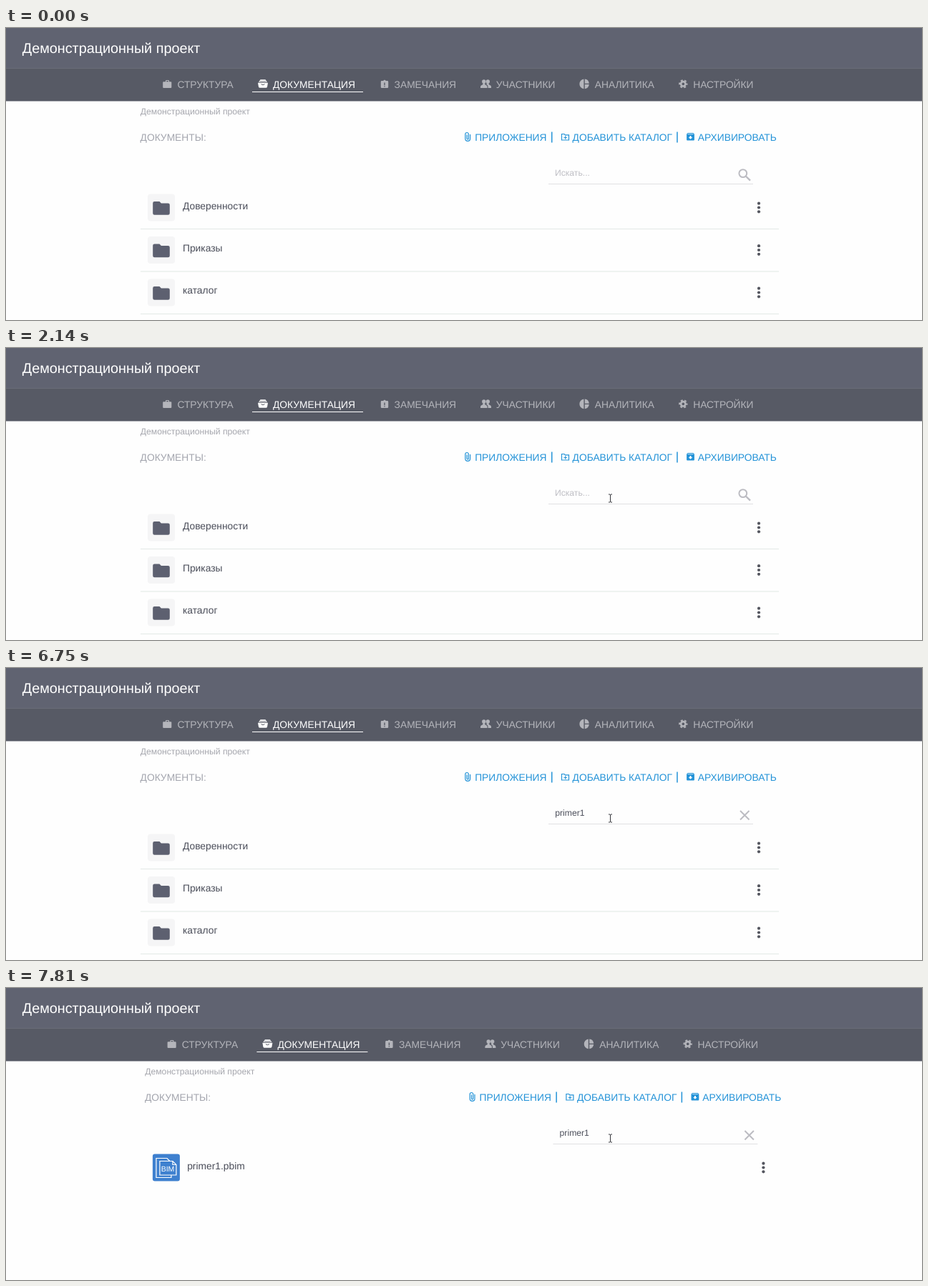
An HTML page that plays this animation: 1280x409 px, repeating every 8000 ms.

```html
<!DOCTYPE html>
<html lang="ru">
<head>
<meta charset="utf-8">
<title>Документы проекта</title>
<style>
  html, body { margin: 0; width: 100%; height: 100%; overflow: hidden; background: #fefefe; }
  svg { display: block; width: 1280px; height: 409px; }
  text { font: 13.8px "Liberation Sans", Arial, sans-serif; text-rendering: geometricPrecision; white-space: pre; }
  .title { font-size: 19.8px; fill: #fff; }
  .tab { fill: #b4b5bb; }
  .active { fill: #fff; }
  .crumb { font-size: 12.2px; fill: #a6a7ae; }
  .label { fill: #a3a5ae; }
  .link { fill: #2493d8; }
  .line { fill: none; stroke: #2493d8; stroke-width: 1.2; }
  .hint { font-size: 12.2px; fill: #bfbfc5; }
  .query { font-size: 12.2px; fill: #4d505c; }
  .name { fill: #4a4d59; }
  .glyph { fill: none; stroke: #bcbcc2; stroke-width: 2; }
  .dots { fill: #54565f; }
  .pointer { fill: #fff; stroke: #25262c; stroke-width: 1; stroke-linejoin: round; }
</style>
</head>
<body>
<svg viewBox="0 0 1280 409">
  <defs>
    <g id="dots" class="dots">
      <circle cx="1052" cy="245.7" r="2.1"/><circle cx="1052" cy="251.5" r="2.1"/><circle cx="1052" cy="257.3" r="2.1"/>
    </g>
    <g id="row">
      <rect x="198" y="232.5" width="38" height="38" rx="4" fill="#f5f5f6"/>
      <path d="M207.500 243h7l2.400 2.400h9.600a2.300 2.300 0 0 1 2.300 2.300v11.800a2.300 2.300 0 0 1-2.300 2.300h-19a2.300 2.300 0 0 1-2.300-2.300v-14.200a2.300 2.300 0 0 1 2.300-2.300z" fill="#5d6070"/>
      <use href="#dots"/>
      <rect x="188" y="281" width="892" height="1" fill="#e2e9e6"/>
    </g>
  </defs>

  <rect width="1280" height="409" fill="#fefefe"/>
  <rect width="1280" height="57" fill="#606371"/>
  <rect y="56" width="1280" height="1" fill="#6a6c78"/>
  <rect y="57" width="1280" height="45.500" fill="#575a65"/>
  <text class="title" x="22.800" y="35">Демонстрационный проект</text>

  <g id="page">
    <g class="tab">
      <path fill-rule="evenodd" d="M220.200 75.300h2.800v-1.300q0-1 1-1h3q1 0 1 1v1.300h2.300q1 0 1 1v6.600q0 1-1 1h-10.100q-1 0-1-1v-6.600q0-1 1-1zm4-1.200v1.200h2.600v-1.200z"/>
      <path fill-rule="evenodd" d="M525 74h2.300a1.800 1.800 0 0 1 3.400 0h2.300q1.200 0 1.200 1.200v7.600q0 1.200-1.200 1.200h-8q-1.200 0-1.200-1.200v-7.600q0-1.200 1.200-1.200zm3.300 2.500v3.800h1.400v-3.800zm0 4.800v1.300h1.400v-1.300z"/>
      <circle cx="667.800" cy="75" r="2.700"/>
      <circle cx="673.300" cy="75" r="2.700"/>
      <path d="M663 84v-2q0-1.700 3.300-2.800v-2h3v2q3.200 1.100 3.200 2.800v2zM673.600 84v-2q0-2-2.300-3.200l.7-1.600h2.700v2q3.300 1.100 3.300 2.800v2z"/>
      <path d="M807.400 71.600v13.600a6.850 6.850 0 0 1 0-13.600zM808.800 71.600a6.800 6.800 0 0 1 6 6.100h-6zM808.800 79.100h6a6.800 6.800 0 0 1-6 6.100z"/>
      <g fill="none" stroke="#b4b5bb">
        <circle cx="946.300" cy="78.300" r="3.200" stroke-width="2.600"/>
        <circle cx="946.300" cy="78.300" r="5.200" stroke-width="1.900" stroke-dasharray="2.900 2.545" stroke-dashoffset="1.450"/>
      </g>
      <text x="239.400" y="83.800">СТРУКТУРА</text>
      <text x="542.600" y="83.800">ЗАМЕЧАНИЯ</text>
      <text x="684.800" y="83.800">УЧАСТНИКИ</text>
      <text x="822.800" y="83.800">АНАЛИТИКА</text>
      <text x="960.200" y="83.800">НАСТРОЙКИ</text>
    </g>
    <g class="active">
      <path d="M355.500 72.300h7l2.500 3.500h-12zM352 76.700h14l-1 5.800q-.4 1.300-1.700 1.300h-8.600q-1.300 0-1.700-1.300z"/>
      <path d="M356.500 78.800q2.500 1.800 5 0" fill="none" stroke="#575a65"/>
      <path d="M354.700 74.800h8.600" stroke="#575a65" stroke-width=".7"/>
      <text x="373" y="83.800">ДОКУМЕНТАЦИЯ</text>
      <rect x="344" y="89" width="155" height="1"/>
    </g>

    <text class="crumb" x="187.800" y="121.300">Демонстрационный проект</text>
    <text class="label" x="187.600" y="157.800">ДОКУМЕНТЫ:</text>
    <g class="link">
      <path class="line" d="M648.600 149v6a3.400 3.400 0 0 1-6.800 0v-6.200a2.300 2.300 0 0 1 4.600 0v6a1.150 1.150 0 0 1-2.300 0v-5.200"/>
      <path class="line" d="M776.500 148.500h3.700l1.200 1.300h5.100v7.200h-10zM779.500 153.500h4.400M781.700 151.300v4.400"/>
      <path fill-rule="evenodd" d="M952.500 147h8l1.400 1.800v7.700q0 1-1 1h-8.800q-1 0-1-1v-7.700zm0 1.100v.7h8v-.7zm3 2.900v2h-1.800l2.800 2.800 2.800-2.800h-1.800v-2z"/>
      <text x="655.200" y="157.800">ПРИЛОЖЕНИЯ</text>
      <text x="791.600" y="157.800">ДОБАВИТЬ КАТАЛОГ</text>
      <text x="966.800" y="157.800">АРХИВИРОВАТЬ</text>
      <rect x="762" y="145.500" width="1.500" height="15"/>
      <rect x="937.200" y="145.500" width="1.500" height="15"/>
    </g>

    <rect x="758" y="218" width="286" height="1" fill="#e0e0e3"/>
    <g id="empty">
      <text class="hint" x="766.900" y="207">Искать...</text>
      <g class="glyph"><circle cx="1029.800" cy="203.600" r="5.400"/><path d="M1033.700 207.500l6.300 6.100" stroke-width="2.400"/></g>
    </g>
    <path id="clear" class="glyph" d="M1026 200l12.500 12.500M1038.500 200L1026 212.500"/>
    <text id="query" class="query" x="767.200" y="207"></text>
    <rect id="caret" y="197" width="1" height="13" fill="#4d505c"/>

    <g id="list">
      <use href="#row"/><use href="#row" y="59.500"/><use href="#row" y="119"/>
      <g class="name">
        <text x="247" y="253.500">Доверенности</text>
        <text x="247" y="313">Приказы</text>
        <text x="247" y="372.300">каталог</text>
      </g>
    </g>
    <g id="found">
      <rect x="198.500" y="232.500" width="38" height="38" rx="3" fill="#3e80cf"/>
      <g fill="none" stroke="#fff" stroke-width="1.200">
        <path d="M224.500 262v3.500h-21v-27h15l4 4"/>
        <path d="M208.500 242.500h18l5 5v14.500h-23z" fill="#3e80cf"/>
        <path d="M226.500 242.500v5h5"/>
      </g>
      <text x="210.300" y="257" fill="#fff" style="font-size:10.500px">BIM</text>
      <text class="name" x="246.800" y="253.500">primer1.pbim</text>
      <use href="#dots"/>
    </g>
  </g>

  <g id="spinner" fill="none" stroke-width="2">
    <circle cx="640" cy="240.500" r="10.800" stroke="#dcdcdf"/>
    <path d="M640 251.300a10.800 10.800 0 0 1-10.800-10.800" stroke="#565967"/>
  </g>
  <g id="hand">
    <path class="pointer" d="M-1.500 11V1.300a1.500 1.500 0 0 1 3 0V7q.3-1.300 1.500-1.200 1.200.1 1.300 1.500.3-1 1.400-.8 1 .2 1.100 1.400.4-.7 1.200-.4.800.3.800 1.400v4.100q0 1.600-.9 2.800l-.4 2H.6l-.8-1.800q-2.400-2.700-4-5.400-.5-1.400.4-1.800 1-.3 2.300 2.200z"/>
    <path d="M1.500 7v2.800M4.300 7.300v2.700M6.800 8v2.200" stroke="#25262c" stroke-width=".8"/>
  </g>
  <path id="beam" d="M-2.500-5.500h2l.5.500.5-.5h2M0-5v10M-2.500 5.500h2l.5-.5.5.5h2" fill="none" stroke="#33343a"/>
</svg>
<script>
const LOOP = 8000;
const $ = id => document.getElementById(id);
const [page, empty, clear, query, caret, list, found, spinner, hand, beam] =
  ['page', 'empty', 'clear', 'query', 'caret', 'list', 'found', 'spinner', 'hand', 'beam'].map($);
const WORD = 'primer1';
const KEYS = [3590, 4260, 4620, 5030, 5230, 5540, 6240];
const CARET = [[1660, 2140], [2640, 3180], [3590, 4130], [4260, 6070], [6240, 6750], [7260, 7810]];
const MOVE = { from: 480, to: 1090, x: [335, 844.5], y: [405, 210.5] };
const LOAD = 7230, RELIST = 7420, RESULT = 7610;

const show = (el, on) => el.setAttribute('visibility', on ? 'visible' : 'hidden');
const place = (el, x, y) => el.setAttribute('transform', `translate(${x} ${y})`);
const easeOut = ([a, b], p, power) => a + (b - a) * (1 - (1 - p) ** power);

function drawPointer(t) {
  const tick = t < MOVE.to ? Math.floor((t - MOVE.from) / 30) * 30 : MOVE.to - MOVE.from;
  const p = Math.max(0, Math.min(1, tick / (MOVE.to - MOVE.from)));
  const x = easeOut(MOVE.x, p, 2.06);
  const y = easeOut(MOVE.y, p, 1.3);
  const overField = y < 220;
  show(hand, t >= MOVE.from && !overField);
  show(beam, t >= MOVE.from && overField);
  place(overField ? beam : hand, x, y);
}

function drawSearch(t) {
  const typed = WORD.slice(0, KEYS.filter(k => t >= k).length);
  if (query.textContent !== typed) query.textContent = typed;
  show(empty, !typed);
  show(clear, typed);
  show(caret, CARET.some(([on, off]) => t >= on && t < off));
  caret.setAttribute('x', 767 + (typed ? query.getComputedTextLength() : 0));
}

function drawResults(t) {
  const loading = t >= LOAD && t < RELIST;
  const done = t >= RESULT;
  // the page recentres when the scrollbar goes away
  place(page, loading || done ? 6.4 : 0, 0);
  show(list, !loading && !done);
  show(found, done);
  show(spinner, loading);
  spinner.setAttribute('transform', `rotate(${(t - LOAD) / 750 * 360} 640 240.5)`);
}

const start = performance.now();
function frame() {
  const t = (performance.now() - start) % LOOP;
  drawPointer(t);
  drawSearch(t);
  drawResults(t);
  requestAnimationFrame(frame);
}
frame();
</script>
</body>
</html>
```
